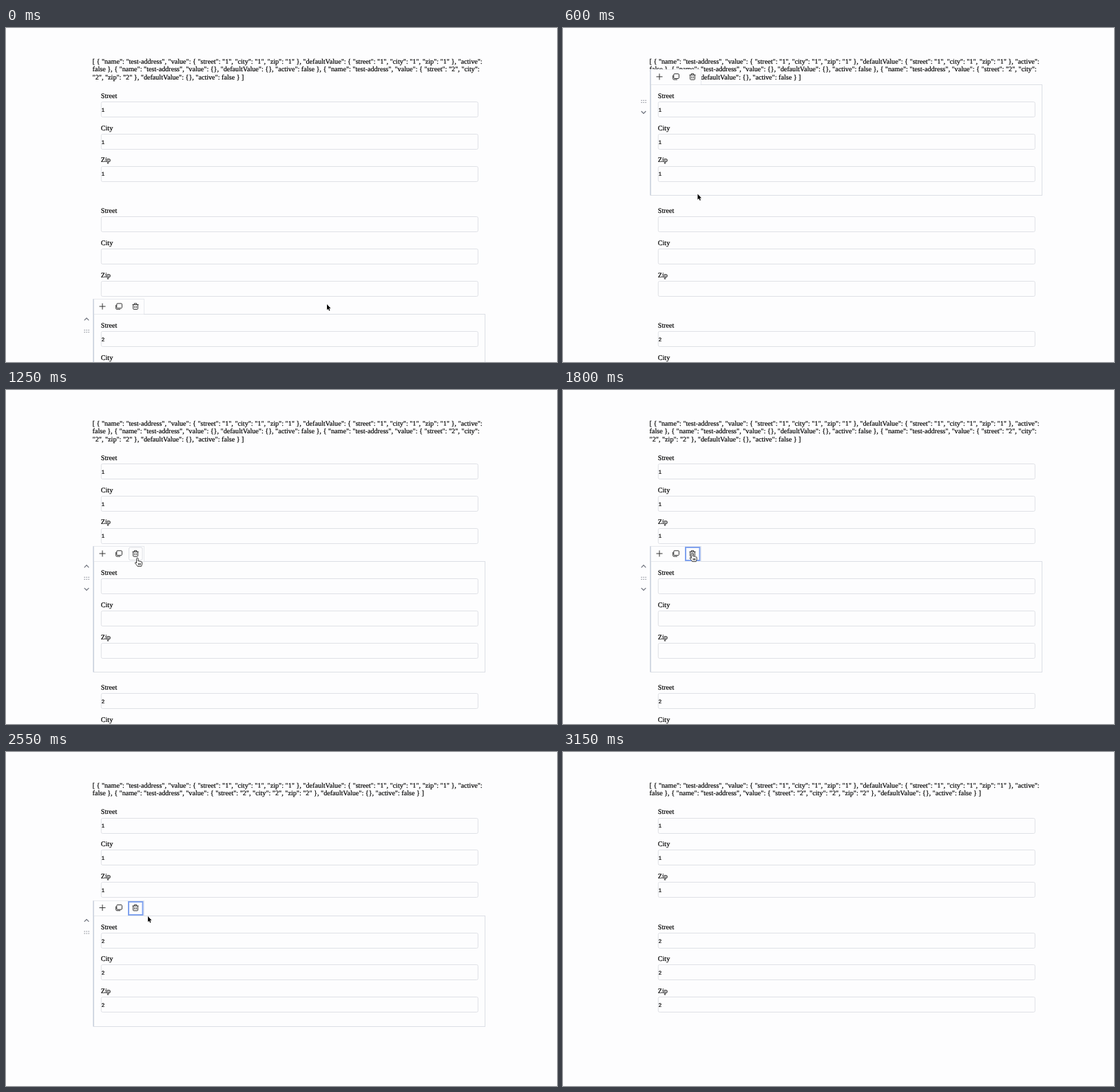
Animation, 800 px wide and 486 px high, one loop 3.95 s. Source, as an HTML page:

```html
<!DOCTYPE html>
<html lang="en">
<head>
<meta charset="utf-8">
<title>Address blocks</title>
<style>
html, body { margin: 0; width: 100%; height: 100%; overflow: hidden; background: #fdfdfe; }
svg { display: block; }
text { font: 10.13px "Liberation Serif", Times, serif; text-rendering: geometricPrecision; white-space: pre; stroke: #000; stroke-width: .2; }
.value { font: 7.8px "Liberation Sans", Arial, sans-serif; }
.field { fill: #fdfdfe; stroke: #dfe1e6; }
.frame { fill: none; stroke: #dcdfe5; }
.bar { fill: #fdfdfe; stroke: #e8eaee; }
.icon { fill: none; stroke: #333; stroke-width: 1; }
.arrow { fill: none; stroke: #666a76; stroke-width: 1.1; }
.hover { fill: #fdfdfe; stroke: #dcdee3; }
.focus { fill: #fdfdfe; stroke: #80a2ee; stroke-width: 2; }
</style>
</head>
<body>
<svg id="stage" width="800" height="486" viewBox="0 0 800 486"></svg>
<script>
const LOOP = 3950, STEP = 50, LINE = 11.4, PITCH = 167.1;
const DELETED = 1850;
const stage = document.getElementById('stage');

const address = n => `{ "street": "${n}", "city": "${n}", "zip": "${n}" }`;
const first = `[ { "name": "test-address", "value": ${address(1)}, "defaultValue": ${address(1)}, "active":`;
const before = [
  first,
  'false }, { "name": "test-address", "value": {}, "defaultValue": {}, "active": false }, { "name": "test-address", "value": { "street": "2", "city":',
  '"2", "zip": "2" }, "defaultValue": {}, "active": false } ]'
];
const after = [
  first,
  `false }, { "name": "test-address", "value": ${address(2)}, "defaultValue": {}, "active": false } ]`
];

// time, x, y of the pointer's tip
const path = [
  [0, 466, 402], [100, 432, 372], [200, 335, 300], [300, 248, 249], [400, 212, 231],
  [500, 198, 234], [600, 195.5, 241.5], [750, 194, 256], [900, 197, 264], [1100, 199, 259],
  [1250, 190.8, 245], [1450, 187.5, 238], [2500, 187.5, 238], [2550, 206, 239],
  [2800, 250, 215], [3050, 360, 120], [3100, 400, 62]
];

// time, index of the active block (-1 for none)
const activity = [[0, 2], [100, 1], [350, 0], [700, 1], [2800, 0], [3150, -1]];

const text = (x, y, s, cls = '') => `<text class="${cls}" x="${x}" y="${y}">${s}</text>`;
const rect = (x, y, w, h, cls, r = 0) =>
  `<rect class="${cls}" x="${x}" y="${y}" width="${w}" height="${h}" rx="${r}"/>`;
const draw = (x, y, d, cls) => `<path class="${cls}" transform="translate(${x} ${y})" d="${d}"/>`;

function pointerAt(t) {
  const i = path.findIndex(p => p[0] > t);
  if (i < 0) return path[path.length - 1].slice(1);
  const [t0, x0, y0] = path[i - 1], [t1, x1, y1] = path[i];
  const k = (t - t0) / (t1 - t0);
  return [x0 + (x1 - x0) * k, y0 + (y1 - y0) * k];
}

function form(top, value) {
  return ['Street', 'City', 'Zip'].map((label, i) => {
    const y = top + 46.8 * i;
    return text(137.8, y + 19.4, label) +
      rect(138.3, Math.floor(y + 25.05) + .5, 547, 22, 'field', 2) +
      text(138.7, y + 39.4, value, 'value');
  }).join('');
}

function controls(top, isFirst, isLast, button) {
  const edge = Math.round(top - .4) + .5, mid = top - 11.5;
  let out = rect(127.5, edge, 568, 161, 'frame') +
    rect(126.5, edge - 22, 74, 22, 'bar') +
    `<path d="M127 ${edge - 22}V${edge + 161}" stroke="#ccd3df" stroke-width="1.6"/>` +
    `<path d="M200 ${edge}H696" stroke="#dcdfe5"/>`;
  if (button === 'hover') out += rect(178.5, mid - 9, 19.5, 18.5, 'hover', 2);
  if (button === 'focus') out += rect(178, Math.round(mid) - 9, 20.5, 19, 'focus');
  out += draw(140, mid, 'M-4.5 0H4.5M0-4.5V4.5', 'icon') +
    draw(164, mid, 'M-2.2-4.2H3.2Q4.4-4.2 4.4-3V1.4Q4.4 2.6 3.2 2.6H-2.2Q-3.2 2.6-3.2 1.4V-3Q-3.2-4.2-2.2-4.2ZM-4.4-2V2.8Q-4.4 4.2-3 4.2H2', 'icon') +
    draw(188, mid, 'M-4.5-2.6H4.5M-1.8-2.6V-4.3H1.8V-2.6M-3.4-2.6V3.4Q-3.4 4.3-2.5 4.3H2.5Q3.4 4.3 3.4 3.4V-2.6M-1.2-.6V2.4M1.2-.6V2.4', 'icon');
  if (!isFirst) out += draw(117, top + 7, 'M-3.3 1.8 0-1.6 3.3 1.8', 'arrow');
  if (!isLast) out += draw(117, top + 40.4, 'M-3.3-1.8 0 1.6 3.3-1.8', 'arrow');
  for (let i = 0; i < 6; i++)
    out += `<rect x="${113.5 + i % 3 * 3}" y="${top + 22.4 + (i > 2) * 3}" width="1.2" height="1.2" fill="#777b86"/>`;
  return out;
}

function pointer(t) {
  const [x, y] = pointerAt(t);
  const hand = t >= 1200 && t < 2550;
  return hand
    ? `<path transform="translate(${x} ${y})" fill="#fff" stroke="#222" stroke-width=".9" stroke-linejoin="round"
        d="M-1.2 7V.6Q-1.2-.6 0-.6T1.2.6V4Q2.3 3.2 3.1 4.3 4.4 3.6 5.1 4.9 6.8 4.6 6.8 6.2V8.4Q6.6 9.6 5.6 11.6H.2Q-1 9.6-3 7.4-3.8 6-2.7 5.7-1.9 5.7-1.2 7ZM1.5 7V9.7M3 7V9.7M4.5 7V9.7"/>`
    : `<path transform="translate(${x} ${y})" fill="#000" stroke="#fff" stroke-width=".8" paint-order="stroke"
        d="M0 0V8.2L1.9 6.6 3.1 9.5 4.4 8.9 3.2 6.1H5.5Z"/>`;
}

function render(t) {
  const gone = t >= DELETED;
  const lines = gone ? after : before;
  const values = gone ? [1, 2] : [1, '', 2];
  const top = 82.4 - (gone ? LINE : 0);
  const active = activity.filter(a => a[0] <= t).pop()[1];
  const button = t >= 1700 && t < 2800 ? 'focus' : t >= 1200 && t < 1700 ? 'hover' : '';

  let out = lines.map((s, i) => text(125.6, 52 + LINE * i, s)).join('');
  out += values.map((v, i) => form(top + PITCH * i, v)).join('');
  if (active >= 0)
    out += controls(top + PITCH * active, active === 0, active === values.length - 1, button);
  if (t < 3150) out += pointer(t);
  stage.innerHTML = out;
}

let shown = -1;
function tick() {
  const t = Math.floor(performance.now() % LOOP / STEP) * STEP;
  if (t !== shown) render(shown = t);
  requestAnimationFrame(tick);
}
tick();
</script>
</body>
</html>
```
